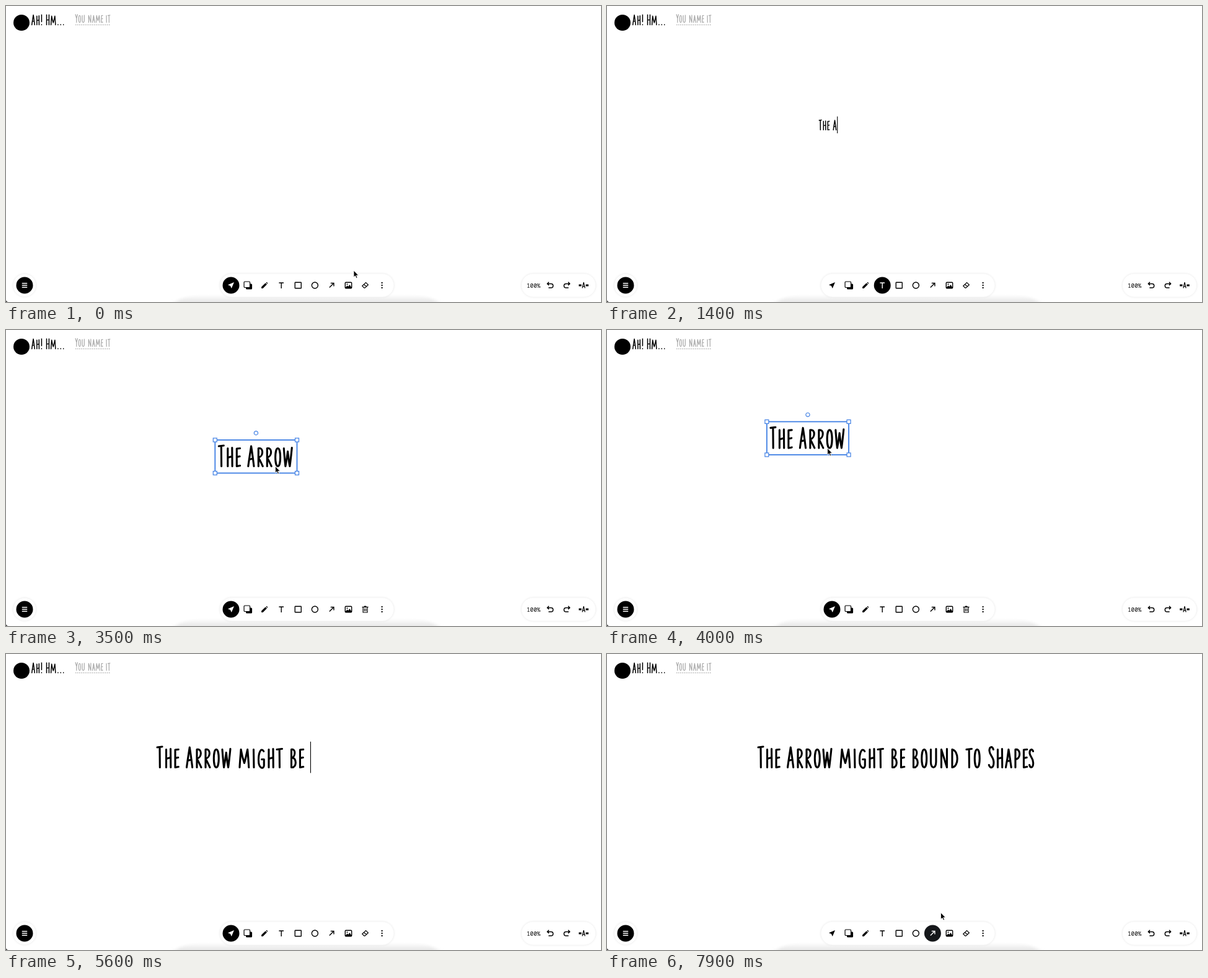
These frames come from a looping animation (960x479 px, 8000 ms). An HTML page:

```html
<!DOCTYPE html>
<html lang="en">
<head>
<meta charset="utf-8">
<title>Whiteboard text demo</title>
<style>
  html, body { margin: 0; width: 100%; height: 100%; overflow: hidden; background: #fff; }
  svg { display: block; width: 100vw; height: 100vh; }
  .hand path { fill: none; stroke: currentColor; stroke-width: 3.1; stroke-linecap: round; stroke-linejoin: round; }
  .pill { fill: #fff; stroke: #f4f4f4; filter: drop-shadow(0 0 1.5px #0001); }
  .tool { color: #000; fill: none; stroke: currentColor; stroke-width: 1.4; }
  .tool .disk { display: none; stroke: none; fill: #000; }
  .tool.on { color: #fff; }
  .tool.on .disk { display: inline; }
  .solid { fill: currentColor; stroke: none; }
  .select { fill: #fff; stroke: #3f7fe4; }
  .zoom { font: 500 9.3px "Noto Sans Mono", "DejaVu Sans Mono", monospace; }
</style>
</head>
<body>
<svg viewBox="0 0 960 479" preserveAspectRatio="none">
  <defs>
    <linearGradient id="shade" x2="0" y2="1">
      <stop offset="0" stop-color="#fff"/>
      <stop offset="1" stop-color="#e4e4e4"/>
    </linearGradient>
    <filter id="soft" x="-10%" y="-60%" width="120%" height="220%"><feGaussianBlur stdDeviation="5 1.5"/></filter>
  </defs>

  <circle cx="25" cy="27" r="13"/>
  <g id="title" class="hand"/>
  <g id="hint" class="hand" color="#a9a9a9"/>
  <path d="M112 30.5H169" stroke="#999" stroke-dasharray="1.5 1.5"/>

  <path d="M272 481Q285 467 320 467H650Q685 467 698 481Z" fill="url(#shade)" filter="url(#soft)"/>
  <path d="M0 476Q.5 478.5 3 479H0Z" fill="#222"/>

  <circle class="pill" cx="30" cy="452" r="18.5"/>
  <circle cx="30" cy="452" r="13.5"/>
  <path d="M25.8 448.7h8.4m-8.4 3.3h8.4m-8.4 3.3h8.4" stroke="#fff" stroke-width="1.4"/>

  <rect class="pill" x="345" y="433" width="281" height="38" rx="19"/>
  <g id="tools"></g>

  <rect class="pill" x="831.5" y="433" width="120" height="38" rx="19"/>
  <text class="zoom" x="840" y="455.5">100%</text>
  <g fill="none" stroke="#000" stroke-width="1.5">
    <path id="undo" transform="translate(878 452)" d="M-2-5.2L-4.6-2.6L-2 0M-4.4-2.6H1.4A3.3 3.3 0 0 1 1.4 4H-2.6"/>
    <use href="#undo" transform="matrix(-1 0 0 1 1783 0)"/>
    <g transform="translate(932 452)">
      <path d="M-7.8 0h4.3M3.5 0H7.8" stroke-width="3"/>
      <path d="M-2.2 4.5L0-4.8L2.2 4.5M-1.7 1.8H1.7" stroke-width="1.2"/>
    </g>
  </g>

  <g id="line" class="hand"/>
  <path id="caret" stroke="#000" stroke-width="1.1"/>
  <g id="frame" class="select">
    <rect fill="none" stroke-width="1.8"/>
    <g id="grips" stroke-width="1.2"/>
  </g>
  <path id="cursor" d="M0 0V10.8L2.5 8.6L4.2 12.4L6 11.6L4.3 7.9H7.7Z" stroke="#fff" stroke-width=".8"/>
</svg>

<script>
const $ = id => document.getElementById(id);
const make = (parent, tag, attrs) => {
  const el = parent.appendChild(document.createElementNS('http://www.w3.org/2000/svg', tag));
  for (const key in attrs) el.setAttribute(key, attrs[key]);
  return el;
};
const show = (el, on) => el.style.display = on ? '' : 'none';

// Hand-lettered small caps: advance width, then strokes standing on y = 0.
const glyphs = {
  ' ': [9.5, ''],
  '!': [8, 'M4-33L4-10M4-1L4 0'],
  '.': [9, 'M4-1L4 0'],
  A: [15, 'M1.5 0C3-12 5-24 6.3-32.5C8-22 9.5-10 10.7 0M3.2-11L9.3-12.5'],
  H: [15, 'M3-33L3 0M11-33L11 0M3-16L11-17'],
  S: [13, 'M9-29C7.5-35 2.5-34 2.5-27C3-19 9.5-17 9.5-8C9.5 2 3.5 2 1.8-4'],
  T: [13.5, 'M2-32.5L10-33.5M6-33L6.3 0'],
  Y: [12.5, 'M1.5-33L6-17L10-33M6-17L6 0'],
  a: [14, 'M1.5 0C3.5-10 5-20 6-29C7.5-20 9-10 10.3 0M3.2-10L9-11'],
  b: [14, 'M3-29L3 0M3-29C10-31 10-18 4-15.5C12-16 12 1 3 0'],
  d: [15, 'M3-29L3 0M3-29C14-27 14-1 3 0'],
  e: [10.5, 'M8.3-29L3-28.5L3 0L8.3-1M3-15L7.8-16'],
  g: [16.5, 'M11.3-26C7-33 3-24 3-12C3 3 11.5 3 11.8-3L11.8-13L8-13'],
  h: [14.5, 'M3-29L3 0M10-30L10.3 0M3-14L10-16'],
  i: [8.5, 'M3.5-29L4 0'],
  m: [21.5, 'M2.5 0C3-10 4-20 4.6-29C6-20 8-13 10-7C12-14 13.7-22 15.2-29C16-20 16.8-10 17.3 0'],
  n: [17.5, 'M3 0L3-29L12 0L12-30'],
  o: [14, 'M6.3-29C1-29 1 0 6.3 0C11.6 0 11.6-29 6.3-29'],
  p: [13.5, 'M3-29L3 0M3-29C12-31 12-13 3-13'],
  r: [14, 'M3-29L3 0M3-29C11.5-31 11.5-16 3-14C6-9 8-4 10 0'],
  s: [10, 'M7.6-26C6-31 1.8-29 2-23C3-16 8-15 7.8-7C7.5 2 3 1 1.6-4'],
  t: [12.5, 'M1.5-29L10-30M5.7-29.5L6 0'],
  u: [17, 'M3-29L3-9C3 3 11.5 3 11.5-9L11.5-30'],
  w: [18, 'M2-29C2.8-18 3.5-9 4.6 0C6.2-9 7.4-16 8.3-24C9.4-14 10.2-7 11.6 0C13-10 14-20 15-30']
};

// Letters a line; returns the pen position before each character and after the last.
function letter(group, text) {
  group.setAttribute('role', 'img');
  group.setAttribute('aria-label', text);
  const stops = [0];
  for (const char of text) {
    const [advance, d] = glyphs[char], x = stops.at(-1);
    make(group, 'path', { d, transform: `translate(${x})` });
    stops.push(x + advance);
  }
  return stops;
}
const place = (el, x, y, scale = 1) =>
  el.setAttribute('transform', `translate(${x} ${y}) scale(${scale})`);

letter($('title'), 'Ah! Hm...');
place($('title'), 41, 30.5, .49);
letter($('hint'), 'You name it');
place($('hint'), 111.5, 26.6, .39);
const line = $('line');
const stops = letter(line, 'The Arrow might be bound to Shapes');

const solid = d => `<path class="solid" d="${d}"/>`;
const icons = [
  solid('M5-5L-5-.8L-1 1L.8 5Z'),
  '<rect class="solid" x="-3" y="-2.5" width="10" height="9" rx="1.5"/><rect x="-6" y="-6" width="9.5" height="9.5" rx="1.3" fill="#fff" stroke-width="1.2"/>',
  solid('M-5 5V2.6L1.5-3.8L3.8-1.5L-2.6 5ZM2.3-4.5L3.4-5.2L5.2-3.4L4.5-2.3Z'),
  '<path d="M-3.8-4H3.8M0-4V5"/>',
  '<rect x="-5" y="-4.7" width="10" height="9.4" rx=".5"/>',
  '<circle r="5"/>',
  '<path d="M-3.6 3.6L3.2-3.2M-1.6-3.5H3.5V1.6"/>',
  '<rect x="-5.2" y="-4.8" width="10.4" height="9.6" rx="1"/>' + solid('M-4.5 3.5L-2 .2L-.3 2.1L2-1L4.6 3V4.5H-4.5Z') + '<circle class="solid" cx="-2" cy="-1.8" r="1"/>',
  '<g id="eraser"><path d="M-4.8 1L1-4.4L4.8-.8L-.4 4.2H-1.8ZM-2.3-1.3L2.2 1.7" stroke-width="1.2"/></g>' +
    '<g id="trash"><path d="M-5-3.6H5M-1.8-4.8H1.8M-3.5-3.6V5H3.5V-3.6M-1.2-1.4V3M1.2-1.4V3" stroke-width="1.2"/></g>',
  [-4, 0, 4].map(y => `<circle class="solid" cy="${y}" r="1.15"/>`).join('')
];
const tools = icons.map((icon, i) => {
  const el = make($('tools'), 'g', { class: 'tool' });
  place(el, 363 + 27.07 * i, 452);
  el.innerHTML = '<circle class="disk" r="13.5"/>' + icon;
  return el;
});
tools[6].firstChild.style.fill = '#15171a';

const frame = $('frame').querySelector('rect');
const grips = [0, 1, 2, 3].map(() => make($('grips'), 'rect', { width: 6, height: 6 }));
const spinner = make($('grips'), 'circle', { r: 3.1 });

// Linear keys: [time, value, ...].
function track(keys, t) {
  let i = keys.findIndex(key => key[0] > t);
  if (i < 0) i = keys.length;
  const from = keys[Math.max(0, i - 1)], to = keys[Math.min(i, keys.length - 1)];
  const f = to[0] > from[0] ? (t - from[0]) / (to[0] - from[0]) : 0;
  return from.slice(1).map((v, n) => v + (to[n + 1] - v) * f);
}
const typing = [[1000, 0], [1300, 3], [1400, 5], [1500, 5], [1900, 9], [4600, 9], [4700, 10],
  [4800, 10], [5600, 19], [5700, 19], [6600, 33], [6700, 34]];
const growth = [[3000, 1], [3300, 2.07]];
const corner = [[3600, 337.3, 178], [4100, 238, 141]];
const pointer = [[0, 561, 428], [100, 527, 441], [200, 527, 441], [400, 446, 458], [500, 445, 453],
  [800, 341, 192], [2000, 400, 196], [2100, 400, 200], [2400, 357, 452], [2500, 358, 452],
  [2700, 388, 186], [2900, 405, 208], [3000, 405, 208], [3300, 469, 231], [3400, 485, 246],
  [3500, 434.5, 220.5], [3600, 434.5, 220.5], [4100, 336, 184], [6900, 470, 220],
  [7400, 524, 452], [7500, 525, 453], [7600, 530, 466], [7800, 543, 430], [7900, 538.5, 418.5]];
const within = (t, from, to) => t >= from && t < to;

function render(t) {
  const active = t < 500 ? 0 : t < 2500 ? 3 : t < 7500 ? 0 : 6;
  tools.forEach((el, i) => el.classList.toggle('on', i === active));

  const count = Math.round(track(typing, t)[0]);
  const [k] = track(growth, t), [x, y] = track(corner, t);
  const scale = .483 * k;
  place(line, x + 4, y + 4 + 18.6 * k, scale);
  [...line.children].forEach((el, i) => show(el, i < count));

  show($('caret'), within(t, 900, 2500) || within(t, 4400, 7500));
  $('caret').setAttribute('d', `M${x + 4 + stops[count] * scale} ${y + .8}V${y + 6 + 22 * k}`);

  const selected = within(t, 2600, 4300);
  const w = 8 + 60 * k, h = 8 + 22 * k;
  show($('frame'), selected);
  show($('trash'), selected);
  show($('eraser'), !selected);
  place($('frame'), x, y);
  frame.setAttribute('width', w);
  frame.setAttribute('height', h);
  grips.forEach((el, i) => place(el, (i & 1) * w - 3, (i >> 1) * h - 3));
  place(spinner, w / 2, -11.3);

  show($('cursor'), !within(t, 900, 2100) && !within(t, 4500, 7000));
  place($('cursor'), ...track(pointer, t));
}

function tick() {
  render(Math.floor(performance.now() % 8000 / 100) * 100);
  requestAnimationFrame(tick);
}
tick();
</script>
</body>
</html>
```
